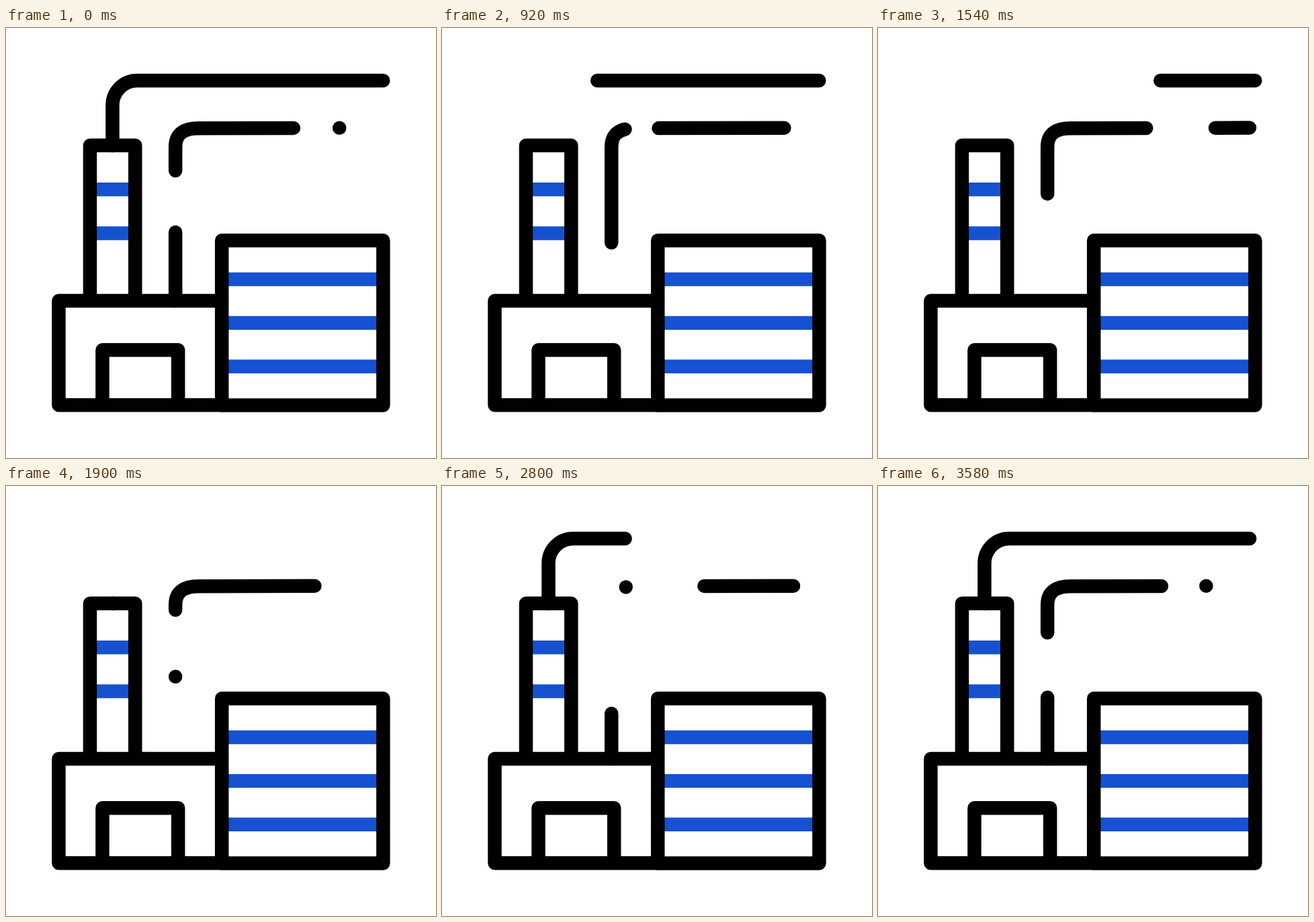
Recreate the animation shown at these times as an HTML page. Size 640x640 px, loop 3600 ms.

```html
<!DOCTYPE html>
<html lang="en">
<head>
<meta charset="utf-8">
<title>Factory smoke</title>
<style>
  html, body { margin: 0; width: 100%; height: 100%; overflow: hidden; background: #fff; }
  svg { display: block; width: 100vw; height: 100vh; }
  .ink { fill: none; stroke: #000; stroke-width: 20.5; stroke-linecap: round; stroke-linejoin: round; }
  .bands { fill: none; stroke: #1651d1; stroke-width: 20.5; }
</style>
</head>
<body>
<svg viewBox="0 0 640 640">
  <g id="smoke" class="ink"></g>
  <path class="bands" d="M130 240.2H187M130 305.5H187M326 374H557M326 439H557M326 503.8H557"/>
  <g class="ink">
    <path d="M125 404V174.8H192.3V404"/>
    <path d="M321 406H78.5V561.2H321"/>
    <path d="M143.5 559V479.3H256.2V559"/>
    <path d="M321.2 316.3H561.4V561.4H321.2Z"/>
  </g>
</svg>
<script>
const LOOP = 3600, SPLIT = 1900;
const UPPER = 'M158.5 175V115A36.7 36.7 0 0 1 195.2 78.3H561.3';
const LOWER = 'M252.2 406V177C252.2 157 265 149.2 287 149.2L561.3 148.6';

// Quadratic ease-in that starts at the given slope.
const ramp = (u, slope) => slope * u + (1 - slope) * u * u;

// Phase 0..1 clears the upper smoke, 1..2 draws it again; both parts speed up.
function phaseAt(ms) {
  const t = ms % LOOP;
  return t < SPLIT
    ? ramp(t / SPLIT, 0.33)
    : 1 + ramp((t - SPLIT) / (LOOP - SPLIT), 0.49);
}

// Travels from 0 to 1 between two phases; c1 and c2 bend the pace as in a Bezier curve.
const travel = (from, to, c1 = 1 / 3, c2 = 2 / 3) => phase => {
  const u = Math.min(Math.max((phase - from) / (to - from), 0), 1), v = 1 - u;
  return 3 * v * v * u * c1 + 3 * v * u * u * c2 + u * u * u;
};

const dot = travel(0.74, 2.13, 0.45, 0.55);

// Each puff spans tail..head of its path; phases above 2 run into the next loop.
const puffs = [
  { d: UPPER, from: 0, to: 1.01, tail: travel(0, 1), head: () => 1 },
  { d: UPPER, from: 1, to: 2, tail: () => 0, head: travel(1, 2) },
  { d: LOWER, from: -0.15, to: 1.645,
    tail: travel(0.03, 1.645, 0.38, 0.17), head: travel(-0.15, 1.63, 0.79, 0.8) },
  { d: LOWER, from: 1.33, to: 2.82,
    tail: travel(1.43, 2.82, 0.28, 0.54), head: travel(1.33, 2.85, 0.88, 0.95) },
  { d: LOWER, from: 0.74, to: 2.13, tail: dot, head: dot },
];

const smoke = document.getElementById('smoke');
for (const puff of puffs) {
  puff.el = document.createElementNS(smoke.namespaceURI, 'path');
  puff.el.setAttribute('d', puff.d);
  smoke.append(puff.el);
  puff.length = puff.el.getTotalLength();
}

function draw(ms) {
  const phase = phaseAt(ms);
  for (const { el, from, to, tail, head, length } of puffs) {
    const p = [phase - 2, phase, phase + 2].find(q => q >= from && q < to);
    el.style.display = p === undefined ? 'none' : '';
    if (p === undefined) continue;
    const start = Math.min(tail(p) * length, length - 0.1);
    const size = Math.max(head(p) * length - start, 0.05);
    el.setAttribute('stroke-dasharray', `${size} 2000`);
    el.setAttribute('stroke-dashoffset', -start);
  }
}

const begin = performance.now();
function tick() {
  draw(performance.now() - begin);
  requestAnimationFrame(tick);
}
tick();
</script>
</body>
</html>
```
